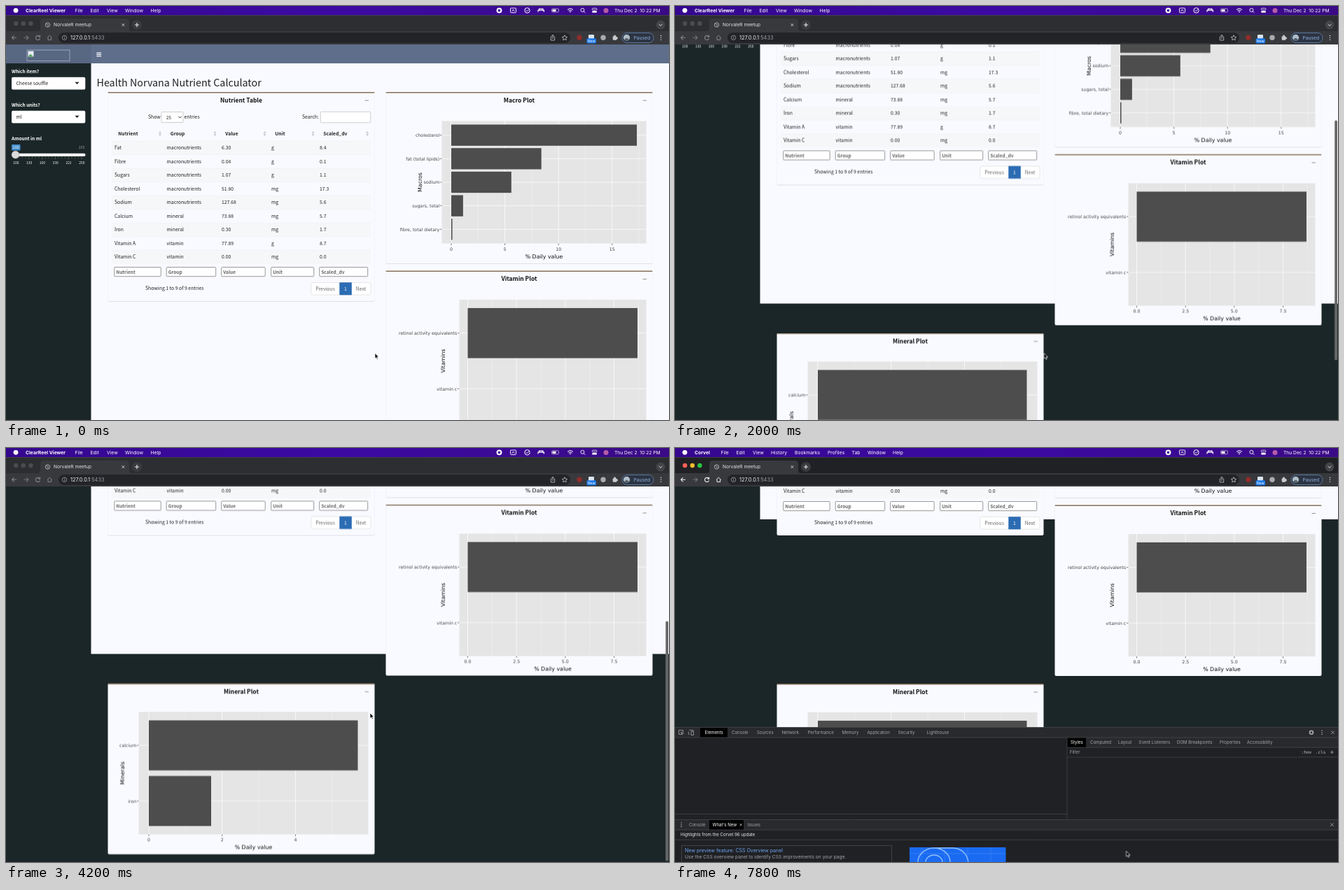
These frames come from a looping animation (947x592 px, 8 s). An HTML page:

```html
<!DOCTYPE html>
<html lang="en">
<head>
<meta charset="utf-8">
<title>Nutrient dashboard</title>
<style>
html, body { margin: 0; width: 100%; height: 100%; overflow: hidden; background: #1b2628; }
svg { display: block; width: 947px; height: 592px; }
text { white-space: pre; }
.ui { font-family: Inter, "Liberation Sans", sans-serif; }
.app { font-family: "Noto Sans CJK JP", "Noto Sans CJK SC", "Noto Sans CJK", "Open Sans", sans-serif; }
.plot { font-family: "DejaVu Sans", sans-serif; }
.mono { font-family: "DejaVu Sans Mono", monospace; }

#page, #thumb, #main, #menu, #mark, #cursor, .idle, .active { animation: 8s step-end infinite; }
#page { animation-name: scroll; }
#thumb { animation-name: thumb; }
#main { animation-name: shrink; }
#menu { animation-name: menu; }
#mark { animation-name: mark; }
#cursor { animation-name: point; }
.idle { animation-name: leave; }
.active { animation-name: enter; }

@keyframes scroll {
  0% { transform: translateY(0); }
  10% { transform: translateY(-5px); }
  12.5% { transform: translateY(-29px); }
  15% { transform: translateY(-57px); }
  17.5% { transform: translateY(-82px); }
  20% { transform: translateY(-102px); }
  22.5% { transform: translateY(-126px); }
  25% { transform: translateY(-166.5px); }
  27.5% { transform: translateY(-238px); }
  30% { transform: translateY(-290.5px); }
  32.5% { transform: translateY(-297.5px); }
  62.5%, 100% { transform: translateY(-297px); }
}
@keyframes thumb {
  0% { opacity: 0; transform: translateY(0); }
  10% { opacity: 1; transform: translateY(3px); }
  12.5% { transform: translateY(18.5px); opacity: 1; }
  15% { transform: translateY(36px); }
  17.5% { transform: translateY(52px); }
  20% { transform: translateY(65px); }
  22.5% { transform: translateY(81px); }
  25% { transform: translateY(107px); }
  27.5% { transform: translateY(153px); }
  30% { transform: translateY(187px); opacity: 1; }
  32.5% { transform: translateY(191px); opacity: 1; }
  65%, 100% { transform: translateY(191px); opacity: 0; }
}
@keyframes shrink { 0% { height: 537px; } 95%, 100% { height: 344px; } }
@keyframes menu { 0% { opacity: 0; } 67.5% { opacity: 1; } 87.5%, 100% { opacity: 0; } }
@keyframes mark {
  0% { opacity: 0; transform: translateY(0); }
  72.5% { opacity: 1; transform: translateY(-81px); }
  75% { opacity: 1; transform: translateY(-29px); }
  77.5% { opacity: 1; transform: translateY(0); }
  82.5%, 100% { opacity: 1; transform: translateY(11.8px); }
}
@keyframes point {
  0% { transform: translate(527px, 496.5px); }
  30% { transform: translate(528.5px, 495px); }
  47.5% { transform: translate(527px, 468px); }
  50% { transform: translate(523px, 420px); }
  52.5% { transform: translate(520px, 379px); }
  55% { transform: translate(530px, 377px); }
  57.5% { transform: translate(560px, 387px); }
  60% { transform: translate(600px, 405px); }
  62.5% { transform: translate(619px, 413px); }
  70% { transform: translate(622px, 430px); }
  72.5% { transform: translate(631px, 486px); }
  75% { transform: translate(639px, 538px); }
  77.5% { transform: translate(643px, 563px); }
  80% { transform: translate(644.5px, 569px); }
  82.5%, 100% { transform: translate(644.5px, 576.5px); }
}
@keyframes leave { 0% { opacity: 1; } 95%, 100% { opacity: 0; } }
@keyframes enter { 0% { opacity: 0; } 95%, 100% { opacity: 1; } }
</style>
</head>
<body>
<script>
const text = (x, y, s, size, fill = '#222', more = '') =>
  `<text x="${x}" y="${y + size * .36}" font-size="${size}" fill="${fill}" ${more}>${s}</text>`;
const rect = (x, y, w, h, fill, more = '') =>
  `<rect x="${x}" y="${y}" width="${w}" height="${h}" fill="${fill}" ${more}/>`;
const circle = (x, y, r, fill, more = '') => `<circle cx="${x}" cy="${y}" r="${r}" fill="${fill}" ${more}/>`;
const path = (d, stroke, width = 1, more = '') =>
  `<path d="${d}" fill="none" stroke="${stroke}" stroke-width="${width}" ${more}/>`;
const group = (attrs, ...parts) => `<g ${attrs}>${parts.flat(9).join('')}</g>`;
const BOLD = 'font-weight="700"', MID = 'text-anchor="middle"', END = 'text-anchor="end"';
const PAPER = '#f9faff', DARK = '#1b2628';

// Application page
const card = (x, y, h, title) => [
  rect(x, y + 1, 381, h, '#000', 'rx="2" opacity=".1"'),
  rect(x, y, 381, h, PAPER, 'rx="2"'),
  rect(x, y, 381, 1.6, '#86715a', 'rx=".8"'),
  text(x + 190.5, y + 11.5, title, 8.45, '#111', `${BOLD} ${MID}`),
  rect(x + 367, y + 11.6, 5.5, .9, '#888'),
];

function plot({ x, y, w, zero, unit, ticks, bars, title, titleX }) {
  const h = 175, gap = h / (bars.length + .2), bottom = y + h;
  const mid = i => y + gap * (.6 + i);
  const at = v => zero + v * unit;
  const half = (ticks[1] - ticks[0]) / 2;
  const vert = (v, width) => at(v) < x + w ? path(`M${at(v)} ${y}V${bottom}`, '#fff', width) : '';
  return group('class="plot"',
    rect(x, y, w, h, '#e5e5e5'),
    ticks.map(t => vert(+t, .7) + vert(+t + half, .3)),
    bars.map((b, i) => path(`M${x} ${mid(i)}h${w}`, '#fff', .7)),
    bars.map(([name, v], i) => [
      rect(zero, mid(i) - gap * .45, v * unit, gap * .9, '#4d4d4d'),
      path(`M${x - 2.5} ${mid(i)}h2.5`, '#444', .7),
      text(x - 3.2, mid(i), name, 6.25, '#444', END)]),
    ticks.map(t => path(`M${at(+t)} ${bottom}v2.5`, '#444', .7) + text(at(+t), y + 183, t, 6.25, '#444', MID)),
    text(x + w / 2, y + 193.5, '% Daily value', 7.85, '#111', MID),
    group(`transform="translate(${titleX} ${y + h / 2}) rotate(-90)"`, text(0, 0, title, 7.85, '#111', MID)));
}

const COLS = [155, 229.5, 308, 379, 448];
const HEADS = ['Nutrient', 'Group', 'Value', 'Unit', 'Scaled_dv'];
const ROWS = `Fat,macronutrients,6.30,g,8.4
Fibre,macronutrients,0.04,g,0.1
Sugars,macronutrients,1.07,g,1.1
Cholesterol,macronutrients,51.80,mg,17.3
Sodium,macronutrients,127.68,mg,5.6
Calcium,mineral,73.88,mg,5.7
Iron,mineral,0.30,mg,1.7
Vitamin A,vitamin,77.89,g,8.7
Vitamin C,vitamin,0.00,mg,0.0`.split('\n').map(r => r.split(','));

const field = (x, y, w, h, stroke) => rect(x, y, w, h, '#fff', `stroke="${stroke}" stroke-width=".7" rx="1"`);

function table() {
  const sortX = [220, 298.5, 369.5, 438.5, 516], fieldW = [66.5, 70.5, 62.5, 61, 69];
  return [
    card(145.5, 123, 299, 'Nutrient Table'),
    text(203, 158.5, 'Show', 6.85), field(222, 151.5, 31, 15, '#bbb'),
    text(229, 159.5, '25', 6.3), path('M246.5 158l2 2 2-2', '#222', 1),
    text(254.5, 158.5, 'entries', 6.85),
    text(423, 158.5, 'Search:', 6.85), field(449.3, 151.3, 71.5, 15.5, '#bbb'),
    HEADS.map((s, i) => [
      text(COLS[i] + 5.3, 182.5, s, 6.75, '#222', BOLD),
      `<path d="M${sortX[i]} 179l2 3h-4zm0 7l2-3h-4z" fill="#c4c7cd"/>`]),
    ROWS.map((row, r) => [
      r % 2 ? '' : rect(151, 193 + r * 19.55, 370, 19.55, '#f6f7f9'),
      path(`M151 ${193 + r * 19.55}h370`, '#eceef2', .6),
      row.map((s, c) => text(COLS[c], 202.5 + r * 19.55, s, 6.85))]),
    HEADS.map((s, i) => [
      field(COLS[i] - .3, 373.5, fieldW[i], 13.2, '#6f6f6f'),
      text(COLS[i] + 2.2, 380.2, s, 6.6, '#666', BOLD)]),
    text(199, 404, 'Showing 1 to 9 of 9 entries', 6.85),
    rect(436, 395.5, 85, 17.5, '#fff', 'stroke="#ddd" stroke-width=".7" rx="2"'),
    rect(476.3, 395.3, 17.5, 18, '#2b6cb3'),
    text(456, 404.3, 'Previous', 6.85, '#666', MID), text(485, 404.3, '1', 6.85, '#fff', MID),
    text(507, 404.3, 'Next', 6.85, '#666', MID),
  ];
}

const picker = (y, label, value) => [
  text(8, y, label, 6.5, '#fff', BOLD),
  rect(8, y + 8.3, 105.3, 17.6, '#fff', 'rx="2"'),
  text(14.5, y + 17, value, 6.75),
  `<path d="M98.5 ${y + 15.3}h6l-3 3.2z" fill="#222"/>`,
];

function sidebar() {
  const marks = [100, 130, 160, 190, 221, 250];
  return [
    rect(0, 55, 947, 27, '#5f6e8b'), rect(0, 55, 121.5, 27, '#586782'),
    rect(30, 63, 61, 15.5, 'none', 'stroke="#a9b1bf" stroke-width=".8"'),
    rect(31.5, 64.5, 8, 8, '#e8eefa'), `<path d="M31.5 72.5l3-4 5 4z" fill="#58a55c"/>`,
    [66.5, 68.8, 71.1].map(y => rect(129.3, y, 6.8, 1.2, '#fff')),
    picker(93.5, 'Which item?', 'Cheese souffle'),
    picker(141.5, 'Which units?', 'ml'),
    text(8, 189.5, 'Amount in ml', 6.5, '#fff', BOLD),
    rect(8, 198, 12.5, 8.6, '#428bca', 'rx="1"'), text(14.2, 202.2, '100', 5.6, '#fff', MID),
    text(112.3, 202, '250', 5.2, '#999', END),
    rect(8, 210.8, 105.5, 4.2, '#f1f2f4', 'rx="2"'),
    Array.from({ length: 21 }, (_, i) => path(`M${14 + i * 4.7} 215.5v${i % 4 ? 2 : 3.5}`, '#999', .5)),
    marks.map((m, i) => text(14.3 + i * 18.8, 224.5, m, 4.9, '#fff', MID)),
    circle(13.5, 212.6, 5.4, '#dcdcdc', 'stroke="#aaa" stroke-width=".5"'),
  ];
}

const page = group('id="page" class="app"',
  rect(121.5, 55, 825.5, 537, PAPER, 'id="main"'),
  sidebar(),
  text(129.5, 109.5, 'Health Norvana Nutrient Calculator', 14.3),
  table(),
  card(542.5, 123, 245, 'Macro Plot'),
  plot({ x: 622.5, y: 164.5, w: 292, zero: 636, unit: 15.32, ticks: ['0', '5', '10', '15'], title: 'Macros', titleX: 591,
    bars: [['cholesterol', 17.3], ['fat (total lipids)', 8.4], ['sodium', 5.6], ['sugars, total', 1.1], ['fibre, total dietary', .1]] }),
  card(542.5, 378.5, 244.5, 'Vitamin Plot'),
  plot({ x: 647.5, y: 420, w: 267, zero: 659.5, unit: 27.87, ticks: ['0.0', '2.5', '5.0', '7.5'], title: 'Vitamins', titleX: 624,
    bars: [['retinol activity equivalents', 8.7], ['vitamin c', 0]] }),
  card(145.5, 634, 244.5, 'Mineral Plot'),
  plot({ x: 189.5, y: 675, w: 328, zero: 204, unit: 52.37, ticks: ['0', '2', '4'], title: 'Minerals', titleX: 166,
    bars: [['calcium', 5.7], ['iron', 1.7]] }));

// Desktop menu bar and browser frame
const menuItems = (cls, app, items) => group(`class="${cls}"`,
  text(28, 6.5, app, 6.8, '#fff', BOLD), items.map(([x, s]) => text(x, 6.5, s, 6.8, '#fff')));

const lights = (cls, colors) => group(`class="${cls}"`, colors.map((c, i) => circle(14.2 + i * 10.6, 25, 3.2, c)));

const navIcons = (cls, color) => group(`class="${cls}"`,
  path('M15 45.3h-6.4M11.5 42.3l-3 3 3 3', color, 1.1),
  path('M25.5 45.3h6.4M29 42.3l3 3-3 3', '#75777b', 1.1),
  path('M48 43.5a3.1 3.1 0 1 0 .5 3M48.6 41.8v2.4h-2.4', color, 1.1),
  path('M59 45.3l3.3-3.2 3.3 3.2M60 45v3.4h4.6V45', color, 1));

const frame = group('class="ui"',
  rect(0, 0, 947, 13, 'url(#bar)'),
  circle(14, 6.3, 3.4, '#fff'),
  menuItems('idle', 'ClearReel Viewer', [[98.5, 'File'], [120.5, 'Edit'], [144, 'View'], [170, 'Window'], [206.5, 'Help']]),
  menuItems('active', 'Corvel', [[65.5, 'File'], [87.5, 'Edit'], [111, 'View'], [137, 'History'], [171, 'Bookmarks'],
    [218, 'Profiles'], [252.5, 'Tab'], [275, 'Window'], [311, 'Help']]),
  circle(704.5, 6.3, 3.9, '#fff'), rect(702.9, 4.7, 3.2, 3.2, '#3f0d98', 'rx=".6"'),
  rect(720.5, 3, 8, 6.6, 'none', 'stroke="#fff" stroke-width=".9" rx="1"'), path('M722.5 8l2-3 2 3', '#fff', .8),
  circle(744.5, 6.3, 3.7, 'none', 'stroke="#fff" stroke-width="1"'), path('M742.5 6l1.7 1.6 3.3-3.4', '#fff', .9),
  path('M760 8.5v-2.4h8.4v2.4M761.5 6V4.2h5.4V6', '#fff', 1.2),
  rect(779.5, 3.8, 10, 5, 'none', 'stroke="#ccc" stroke-width=".7" rx="1.2"'), rect(780.5, 4.8, 5, 3, '#fff'),
  path('M802 5.4q4-3.4 8 0M803.5 7q2.5-2 5 0M805 8.6q1-.8 2 0', '#fff', 1),
  circle(823.4, 5.8, 2.5, 'none', 'stroke="#fff" stroke-width=".9"'), path('M825.2 7.6l2 2', '#fff', 1),
  rect(837.2, 3.2, 6.8, 2.6, 'none', 'stroke="#fff" stroke-width=".8" rx="1.3"'), rect(837.2, 6.9, 6.8, 2.6, '#fff', 'rx="1.3"'),
  circle(857, 6.4, 3.5, '#b55ca6'),
  text(869, 6.5, 'Thu Dec 2  10:22 PM', 6.7, '#fff'),
  rect(0, 13, 947, 24, '#2d2e31'), rect(0, 13, 947, 24, '#202124', 'class="active"'),
  path('M0 13.4h947', '#55565a', .6),
  lights('idle', ['#4b4c50', '#4b4c50', '#4b4c50']), lights('active', ['#ff5f57', '#febc2e', '#28c840']),
  '<path d="M45 36q4 0 4-4v-9q0-5 5-5h117q5 0 5 5v9q0 4 4 4z" fill="#38393d"/>',
  rect(0, 36, 947, 19, '#38393d'),
  circle(59.5, 27, 3.2, 'none', 'stroke="#b5b7bb" stroke-width=".9"'), path('M57.5 25.5l3 1-1 3', '#b5b7bb', .8),
  text(68, 27, 'NorvaleR meetup', 6.6, '#e4e5e7'),
  path('M165.6 25.2l3.6 3.6m0-3.6l-3.6 3.6', '#ddd', .9),
  circle(187, 27, 7, '#3a3b3f'), path('M184 27h6M187 24v6', '#eee', 1.1),
  circle(935, 27, 6.5, '#434448'), path('M932.6 26l2.4 2.3 2.4-2.3', '#ddd', 1),
  navIcons('idle', '#85878b'), navIcons('active', '#f1f1f1'),
  rect(75, 38, 731, 15, '#232428', 'rx="7.5"'),
  circle(83.5, 45.3, 3.2, 'none', 'stroke="#a5a7ab" stroke-width=".8"'), path('M83.5 44.8v2.2M83.5 43.2v.8', '#a5a7ab', .8),
  text(92, 45.5, '127.0.0.1<tspan fill="#999ca1">:5433</tspan>', 7.4, '#f1f1f1'),
  path('M779.5 44h-1.2v5h5.4v-5h-1.2M781 47v-5.5M779.2 43l1.8-1.7 1.8 1.7', '#c6c8cb', .8),
  path('M798 41.7l1.1 2.4 2.6.3-1.9 1.8.5 2.6-2.3-1.3-2.3 1.3.5-2.6-1.9-1.8 2.6-.3z', '#c6c8cb', .8),
  circle(819, 45.3, 3.7, '#8f2d2a'),
  rect(832, 41, 8, 6, '#d9e4f0', 'rx="1"'), rect(829.5, 46.3, 13.5, 7.2, '#1c78e6', 'rx="1.5"'),
  text(836.2, 49.8, 'New', 5.2, '#fff', MID),
  circle(853, 45.3, 3.7, '#a9abae'),
  rect(866.7, 43.2, 5.6, 5.6, '#c9cbce', 'rx="1"'), circle(869.6, 42.8, 1.4, '#c9cbce'), circle(872.6, 46, 1.4, '#c9cbce'),
  rect(880, 38.5, 45, 14, '#2c3442', 'rx="7" stroke="#58779f" stroke-width="1"'),
  circle(886.5, 45.3, 4.6, '#aebdc8'), '<path d="M883 48.3q3.5-5 7 0a4.6 4.6 0 0 1-7 0z" fill="#545f68"/>',
  text(896.5, 45.5, 'Paused', 6.7, '#8fb2e4'),
  [42.4, 45.3, 48.2].map(y => circle(935.5, y, .8, '#ccc')));

// Context menu
const ENTRIES = [[422.5, 'Back'], [434.5, 'Forward'], [446, 'Reload'], [463.5, 'Save As...'], [475, 'Print...'],
  [487, 'Beam...'], [504.3, 'Create QR Code for this Page'], [521.5, 'Translate to English'], [538.8, 'Block element...', 12],
  [550.5, 'Take Webpage Screenshots Entirely - TarnClip', 12], [568, 'View Page Source'], [579.7, 'Inspect']];
const menu = group('id="menu" class="ui"',
  rect(619.5, 414.5, 190, 172.5, '#292d30', 'rx="3" stroke="#4a4f52" stroke-width=".8"'),
  rect(621.5, 562.2, 185.5, 11.6, '#2360c5', 'id="mark" rx="1.5"'),
  [454.7, 495.3, 512.7, 530, 559.3].map(y => path(`M626.5 ${y}h176`, '#50555a', .7)),
  ENTRIES.map(([y, s, dx = 0]) => text(626.5 + dx, y, s, 6.45, s === 'Forward' ? '#6b6f73' : '#eee')),
  circle(630.5, 538.8, 3.6, '#b3322e'), rect(626.5, 546.7, 7.5, 7.5, '#58a6e8', 'rx="1"'),
  path('M799 548l2.5 2.5-2.5 2.5', '#ddd', 1));

// Inspector panel
const LINE = '#494c50', PANEL = '#292a2d', GREY = '#a2a6ab';
const tabs = (y, items, chosen) => items.map(([x, s]) => text(x, y, s, 6.1, s === chosen ? '#fff' : GREY));
const inspector = group('class="ui active"',
  rect(0, 399.5, 947, 192.5, '#202124'),
  rect(0, 399.5, 947, 14.5, PANEL), rect(36, 400, 39, 14, '#000'),
  rect(560, 414, 387, 14, PANEL), rect(560, 414, 27, 14, '#000'),
  rect(0, 531.5, 947, 14.5, PANEL), rect(49, 532, 49, 14, '#000'),
  path('M0 399.5H947M0 414H947M560 428.2H947M560 442H947M560 414V531.5M0 523.5H560M0 531.5H947M0 546H947M0 560.3H947', LINE, .7),
  path('M9.5 409.5h-4v-6h6v2.5M8.5 406l4 1.5-1.8.8-.6 1.8z', GREY, .8),
  path('M20.5 409.5h-1.2v-4M20.5 403.5h5.5v1.5M23 405.5h3.5v5H23z', GREY, .8),
  tabs(406.7, [[42.5, 'Elements'], [81, 'Console'], [117, 'Sources'], [152.5, 'Network'], [189.5, 'Performance'],
    [238.5, 'Memory'], [274.5, 'Application'], [318.5, 'Security'], [359.5, 'Lighthouse']], 'Elements'),
  circle(909, 406.7, 2.4, 'none', `stroke="${GREY}" stroke-width="1.8"`),
  [404, 406.7, 409.4].map(y => circle(924, y, .8, GREY)),
  path('M937.3 404.5l4.4 4.4m0-4.4l-4.4 4.4M936.3 536.5l4.4 4.4m0-4.4l-4.4 4.4', GREY, .9),
  tabs(420.8, [[565, 'Styles'], [593, 'Computed'], [633, 'Layout'], [663, 'Event Listeners'], [717, 'DOM Breakpoints'],
    [778, 'Properties'], [817, 'Accessibility']], 'Styles'),
  rect(560.5, 429, 330, 12.5, '#202124'), text(564, 435.2, 'Filter', 6.1, GREY),
  group('class="mono"', text(895, 435, ':hov', 6, '#ccc'), text(915, 435, '.cls', 6, '#ccc')),
  path('M936 435h5M938.5 432.5v5', GREY, .8),
  [536, 538.7, 541.4].map(y => circle(9, y, .8, GREY)),
  tabs(538.7, [[20, 'Console'], [53.5, "What's New"], [103.5, 'Issues']], "What's New"),
  path('M92.5 537.2l3.2 3.2m0-3.2l-3.2 3.2', '#ccc', .8),
  text(8, 553, 'Highlights from the Corvel 96 update', 6.1, '#e8eaed'),
  rect(9.5, 568.5, 300, 40, 'none', `stroke="${LINE}" stroke-width=".8"`),
  text(14, 575, 'New preview feature: CSS Overview panel', 7, '#6ea7f5'),
  text(14, 584.5, 'Use the CSS overview panel to identify CSS improvements on your page.', 6.7, GREY),
  rect(335, 571, 137.5, 21, '#1a6bf2'),
  path('M335 580h137M352 571v21M385 571v21M418 571v21M451 571v21', '#4a8df6', .5),
  path('M347 592a23 20 0 0 1 46 0M358 592a12 10 0 0 1 24 0M370 572h28q18 2 21 20', '#8fbcfb', 1.4));

const cursor = '<path id="cursor" d="M0 0v7.6l1.8-1.6 1.2 2.7 1.3-.6-1.2-2.6h2.4z" fill="#000" stroke="#fff" stroke-width=".7"/>';

document.body.innerHTML = `<svg viewBox="0 0 947 592" xmlns="http://www.w3.org/2000/svg">
  <defs>
    <linearGradient id="bar"><stop stop-color="#35078f"/><stop offset=".5" stop-color="#3c0aa3"/><stop offset="1" stop-color="#3a0a86"/></linearGradient>
    <clipPath id="view"><rect y="55" width="947" height="537"/></clipPath>
  </defs>
  ${rect(0, 0, 947, 592, DARK)}
  ${group('clip-path="url(#view)"', page,
    rect(942.2, 56.5, 3.8, 343, '#666', 'id="thumb" rx="1.9" stroke="#fff" stroke-opacity=".15" stroke-width=".5"'))}
  ${frame}${menu}${inspector}${cursor}
</svg>`;
</script>
</body>
</html>
```
